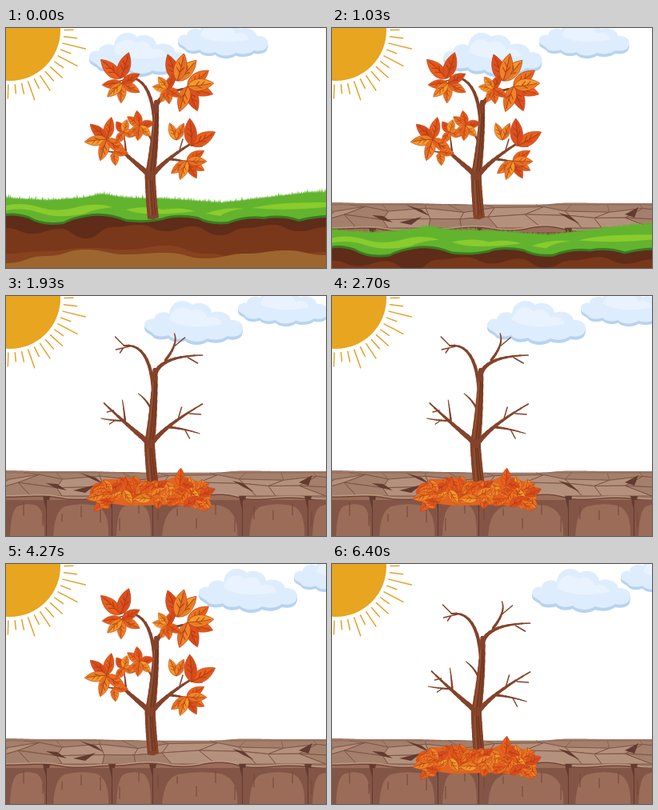
Recreate the animation shown at these times as an HTML page. Size 400 px wide and 300 px high, loop 6510 ms.

```html
<!DOCTYPE html>
<html lang="en">
<head>
<meta charset="utf-8">
<title>Autumn tree</title>
<style>
  html, body { margin: 0; width: 100%; height: 100%; overflow: hidden; background: #fff; }
  svg { display: block; width: 100vw; height: 100vh; }
</style>
</head>
<body>
<svg id="stage" viewBox="0 0 400 300" xmlns="http://www.w3.org/2000/svg"></svg>
<script>
const LOOP = 6510, TREE_STEPS = 25, STEP = LOOP / 2 / TREE_STEPS;
const FALL_STEP = 13;
const stage = document.getElementById('stage');

function el(parent, tag, attrs = {}) {
  const node = document.createElementNS('http://www.w3.org/2000/svg', tag);
  for (const key in attrs) node.setAttribute(key, attrs[key]);
  parent.appendChild(node);
  return node;
}
const group = parent => el(parent, 'g');
const shape = (parent, d, fill, extra) => el(parent, 'path', { d, fill, ...extra });
const line = (parent, d, stroke, width) =>
  shape(parent, d, 'none', { stroke, 'stroke-width': width, 'stroke-linecap': 'round', 'stroke-linejoin': 'round' });

function seeded(seed) {
  return () => (seed = (seed * 16807) % 2147483647) / 2147483647;
}

// Piecewise linear value through [x, y] keys.
function interp(keys, x) {
  let i = 1;
  while (i < keys.length - 1 && x > keys[i][0]) i++;
  const [x0, y0] = keys[i - 1], [x1, y1] = keys[i];
  return y0 + (y1 - y0) * Math.min(1, Math.max(0, (x - x0) / (x1 - x0)));
}

// Closed area below a smooth line through evenly spaced heights.
function hills(heights, bottom) {
  const dx = 400 / (heights.length - 1);
  let d = `M0 ${bottom}V${heights[0]}`;
  for (let i = 1; i < heights.length; i++) {
    const x = i * dx;
    d += `C${x - dx / 2} ${heights[i - 1]} ${x - dx / 2} ${heights[i]} ${x} ${heights[i]}`;
  }
  return d + `V${bottom}Z`;
}

/* sky */
function drawSun() {
  const cx = 5, cy = 3, g = group(stage);
  el(g, 'circle', { cx, cy, r: 63, fill: '#e7a520' });
  [11, 16, 29, 13, 27, 13, 20, 15, 22, 13, 24, 13, 11, 17].forEach((len, i) => {
    const a = (i * 7.1 - 0.5) * Math.PI / 180, c = Math.cos(a), s = Math.sin(a);
    line(g, `M${cx + 68 * c} ${cy + 68 * s}L${cx + (68 + len) * c} ${cy + (68 + len) * s}`, '#e3a229', 1.5);
  });
}

function drawCloud() {
  const g = group(stage);
  const outline = 'M3 37C-3 29 6 23 13 25C14 17 25 14 32 18C33 3 50-3 61 7C68 2 84 6 85 17' +
    'C94 13 107 17 109 26C119 25 127 32 123 40C122 46 112 48 105 46C99 51 88 52 80 49' +
    'C72 55 58 54 52 48C44 51 35 50 31 45C22 48 12 46 11 42Z';
  shape(g, outline, '#b6d3f2', { transform: 'translate(0 4)' });
  shape(g, outline, '#deedfd');
  shape(g, 'M32 26C35 10 50 6 59 15C67 10 78 14 79 23C88 20 96 24 98 31C78 35 50 37 32 26Z', '#e8f3ff');
  return g;
}

/* ground */
function drawSlabs(g) {
  const rnd = seeded(19), rows = [221, 227, 237, 250], cols = 10;
  const grid = rows.map((y, r) => Array.from({ length: cols + 1 }, (_, c) => {
    const inner = r > 0 && r < 3;
    return [(c - .5 + (r % 2) * .35 + (rnd() - .5) * .6) * 400 / (cols - 1), y + (inner ? (rnd() - .5) * 8 : 0)];
  }));
  for (let r = 0; r < 3; r++)
    for (let c = 0; c < cols; c++) {
      const corners = [grid[r][c], grid[r][c + 1], grid[r + 1][c + 1], grid[r + 1][c]];
      const fill = r && rnd() < .6 ? '#b4917c' : '#a47f6b';
      shape(g, 'M' + corners.join('L') + 'Z', fill, { stroke: '#7c5344', 'stroke-width': r ? .9 : .5 });
    }
}

function drawCrackedGround() {
  const g = group(stage), dark = '#633b30';
  shape(g, hills([218, 219, 219, 220, 222, 221, 218.5, 219, 219], 300), '#a27b68');
  drawSlabs(g);
  const rim = [252, 251, 255, 253, 250, 254, 249, 255, 253, 256];
  shape(g, hills(rim.map(y => y - 3), 300), '#bd9a84');
  shape(g, hills(rim.map(y => y - 1.5), 300), '#714739');
  shape(g, hills(rim, 300), '#9b6d59');
  const splits = [0, 51, 133, 184, 296, 378, 430];
  splits.slice(1).forEach((b, i) => {
    const a = splits[i], w = b - a;
    shape(g, `M${a} 255H${b}V300H${b - w * .06}Q${b - w * .05} 268 ${b - w * .25} 262Q${a + w * .5} 258 ${a + w * .28} 263Q${a + w * .12} 268 ${a + w * .1} 300H${a}Z`, '#835546');
    shape(g, `M${b - 5} 250H${b + 4}L${b + 1} 266V300H${b - 1}V266Z`, dark);
  });
  const rnd = seeded(5);
  for (let x = 22; x < 400; x += 24) {
    const y = 258 + 22 * rnd();
    line(g, `M${x} ${y}v${8 + 12 * rnd()}`, '#76493b', 1.1);
  }
  shape(g, 'M50 234L64 235L76 243L62 240ZM92 221L112 227L122 235L110 230ZM283 231L296 234L310 245L297 239ZM366 233L383 224L378 237ZM84 243L112 236L99 246Z', dark);
}

function drawMeadow() {
  const g = group(stage), rnd = seeded(41);
  shape(g, hills([228, 232, 228, 230, 232, 230, 228, 230, 229], 420), '#5e2c19');
  shape(g, hills([250, 257, 251, 263, 249, 246, 254, 248, 259, 250, 246, 254, 249], 420), '#793819');
  shape(g, 'M88 257Q94 247 110 248Q102 257 88 257Z', '#5e2c19');
  shape(g, hills([282, 279, 275, 277, 272, 282, 288, 284, 280], 420), '#87431f');
  shape(g, hills([294, 285, 277, 283, 281, 288, 282, 278, 284], 420), '#9d662f');

  const top = [[0, 212], [50, 215], [95, 212], [120, 207], [150, 212], [200, 213], [270, 218], [330, 211], [380, 205], [400, 205]];
  let turf = 'M0 225';
  for (let x = 0; x <= 402; x += 2) {
    const y = interp(top, x);
    turf += `L${x} ${y + 1}L${x + .6 + rnd()} ${y - 1 - 5 * rnd() * rnd()}`;
  }
  turf += 'L402 234Q385 234 366 239Q345 232 322 236Q300 233 277 242Q255 244 240 236Q214 231 196 237' +
    'Q175 242 150 239Q125 229 102 233Q83 236 72 242Q46 246 28 235Q12 230 0 232Z';
  shape(g, turf, '#3d7921', { transform: 'translate(0 3)' });
  shape(g, turf, '#62b42f');
  shape(g, 'M0 222Q20 217 45 225Q65 231 92 223Q114 218 134 224Q111 226 98 232Q66 239 42 231Q22 224 0 228Z' +
    'M150 227Q176 221 196 227Q218 223 236 229Q172 237 150 227Z' +
    'M250 232Q272 223 298 226Q276 228 268 235ZM308 225Q338 217 400 218V224Q350 229 308 225Z', '#8acb2d');
  return g;
}

/* tree */
const LEAF = 'M0 0C.15-.3.55-.42 1 0C.6.36.2.32 0 0Z';
const LEAF_COLORS = ['#e9601f', '#f0842a', '#dd5120', '#ee7222', '#f39a2c'];

function drawLeaf(parent, color) {
  const g = group(parent);
  shape(g, LEAF, LEAF_COLORS[color % LEAF_COLORS.length], { stroke: '#bd4618', 'stroke-width': .025 });
  shape(g, 'M0 0C.2.24.6.3 1 0Q.5.06 0 0Z', '#c93f16', { opacity: .32 });
  line(g, 'M.02 0Q.5.05.88 0M.3.02L.46-.15M.5.03L.65-.12M.35.03L.52.15', '#a9380f', .03);
  return g;
}
const place = (x, y, angle, length, width = length) =>
  `translate(${x} ${y}) rotate(${angle}) scale(${length} ${width})`;

// Each cluster: stem x, y, leaf length, then leaf angles.
const CLUSTERS = [
  [143, 63, 34, -136, -72],
  [145, 69, 25, 93, 27, 175, -28, 137],
  [214, 66, 35, -110, -47, -76],
  [227, 73, 33, -37, 17, 68, -7, 108],
  [202, 76, 19, 188, 118, 84, 32, -68, -128],
  [126, 139, 28, -78, -138, 173, 107, 35],
  [135, 154, 18, 84, 9],
  [147, 130, 16, -125, -75, 15, 124],
  [167, 122, 19, -144, -101, -11, 45, 135, 97],
  [213, 140, 23, -112, -66],
  [232, 147, 34, -30, -94],
  [226, 166, 25, 141, 29, -30, 61, 110, 2]
];

// Limbs: start and end width, then start, control and end point.
const LIMBS = [
  [14, 13, 184, 238, 181, 210, 180, 182],
  [13, 6, 180, 186, 187, 140, 188, 93],
  [5, 2, 186, 118, 181, 58, 149, 62],
  [5.5, 1.5, 188, 97, 196, 75, 247, 74],
  [3.5, 1.2, 201, 80, 217, 60, 212, 47],
  [7, 1.5, 180, 184, 153, 162, 124, 134],
  [6.5, 1.5, 183, 184, 200, 162, 247, 135],
  [2.5, 1, 149, 156, 136, 156, 120, 153],
  [2.5, 1, 150, 156, 149, 144, 147, 130],
  [3, 1, 184, 144, 178, 130, 167, 122],
  [3, 1, 205, 164, 225, 166, 243, 172]
];
const TWIGS = 'M149 62l-11-11M156 63l-17 4M148 65l-4 6M213 62l12-10M229 77l12 7M216 156l5-17M225 167l6 11M231 147l14 1M136 143l-8 2M137 156l-6 4';

const bend = (y, sway) => sway * Math.min(1, Math.max(0, (238 - y) / 108));

function limbPoint([, , x0, y0, cx, cy, x1, y1], t, sway, dx = 0) {
  const u = 1 - t, mix = (a, b, c) => u * u * a + 2 * u * t * b + t * t * c;
  const y = mix(y0, cy, y1);
  return `${mix(x0, cx, x1) + bend(y, sway) + dx} ${y}`;
}

function drawWood(g, sway) {
  g.replaceChildren();
  const n = 10;
  LIMBS.forEach((limb, k) => {
    for (let i = 0; i < n; i++) {
      const width = limb[0] + (limb[1] - limb[0]) * (i + .5) / n;
      line(g, `M${limbPoint(limb, i / n, sway)}L${limbPoint(limb, (i + 1) / n, sway)}`, '#84432a', width)
        .setAttribute('stroke-linecap', k || i ? 'round' : 'butt');
    }
  });
  line(g, TWIGS, '#84432a', 1.5).setAttribute('transform', `translate(${sway})`);
  for (const [dx, color] of [[-3, '#a35d3c'], [0, '#683119'], [3.5, '#683119']])
    for (const limb of LIMBS.slice(0, 2)) {
      const pts = [.08, .35, .6, .85].map(t => limbPoint(limb, t, sway, dx * (1 - t * .4)));
      line(g, 'M' + pts.join('L'), color, .9);
    }
}

function drawCrown(parent) {
  const rnd = seeded(7), leaves = [];
  CLUSTERS.forEach(([x, y, length, ...angles], c) => angles.forEach((angle, i) => leaves.push({
    node: drawLeaf(parent, c + i * 2),
    pose: place(x, y, angle, length, Math.max(length * .85, 19)),
    drop: 45 + 55 * rnd()
  })));
  return leaves;
}

function drawPile() {
  const g = group(stage), rnd = seeded(23);
  shape(g, 'M106 256L122 229L160 229L186 236L216 224L244 233L256 248L250 265L205 261L150 262Z', '#e4641f');
  const addLeaf = (i, x, y, angle, length) =>
    drawLeaf(g, i).setAttribute('transform', place(x, y, angle, length, length * .95));
  for (let i = 0; i < 85; i++) {
    const u = rnd(), x = 112 + 138 * u;
    const y = 234 + 24 * rnd() + (u < .1 ? 6 : 0);
    const angle = rnd() * 360, length = 15 + 8 * rnd(), r = angle * Math.PI / 180;
    addLeaf(i, x - Math.cos(r) * length / 2, y - Math.sin(r) * length / 2, angle, length);
  }
  addLeaf(0, 217, 238, -86, 23);
  addLeaf(1, 122, 248, 165, 22);
  addLeaf(2, 242, 249, -22, 21);
  addLeaf(3, 236, 256, 38, 20);
  return g;
}

/* scene, back to front */
const farCloud = drawCloud(), nearCloud = drawCloud();
drawSun();
drawCrackedGround();
const meadow = drawMeadow(), wood = group(stage), crown = group(stage);
const leaves = drawCrown(crown), pile = drawPile();

const NEAR_X = [[0, 103], [730, 126], [1330, 151], [1930, 172], [3470, 214], [4270, 240], [4570, 249]];
const FAR_X = [[0, 214], [730, 247], [1330, 269], [1930, 289], [3470, 331], [4270, 359], [4330, 360]];
const SWAY = [[0, 0], [1, -2.5], [3, -6], [5, -5.5], [7, 0], [10, -.5], [12, -2], [14, -1.5], [18, -3], [24, .5]];
let shownStep = -1;

function poseTree(step) {
  if (step === shownStep) return;
  shownStep = step;
  const sway = interp(SWAY, step), falling = step === FALL_STEP;
  drawWood(wood, sway);
  for (const { node, pose, drop } of leaves)
    node.setAttribute('transform', `translate(${sway} ${falling ? drop : 0}) ${pose}`);
  crown.style.display = step <= FALL_STEP ? '' : 'none';
  pile.style.display = step > FALL_STEP ? '' : 'none';
}

function render(t) {
  nearCloud.setAttribute('transform', `translate(${interp(NEAR_X, t)} 4)`);
  farCloud.setAttribute('transform', `translate(${interp(FAR_X, t)} -14) scale(.915)`);
  meadow.setAttribute('transform', `translate(0 ${Math.min(200, 3.8e-5 * t * t)})`);
  poseTree(Math.floor(t / STEP) % TREE_STEPS);
}

const start = performance.now();
function tick() {
  render((performance.now() - start) % LOOP);
  requestAnimationFrame(tick);
}
tick();
</script>
</body>
</html>
```
